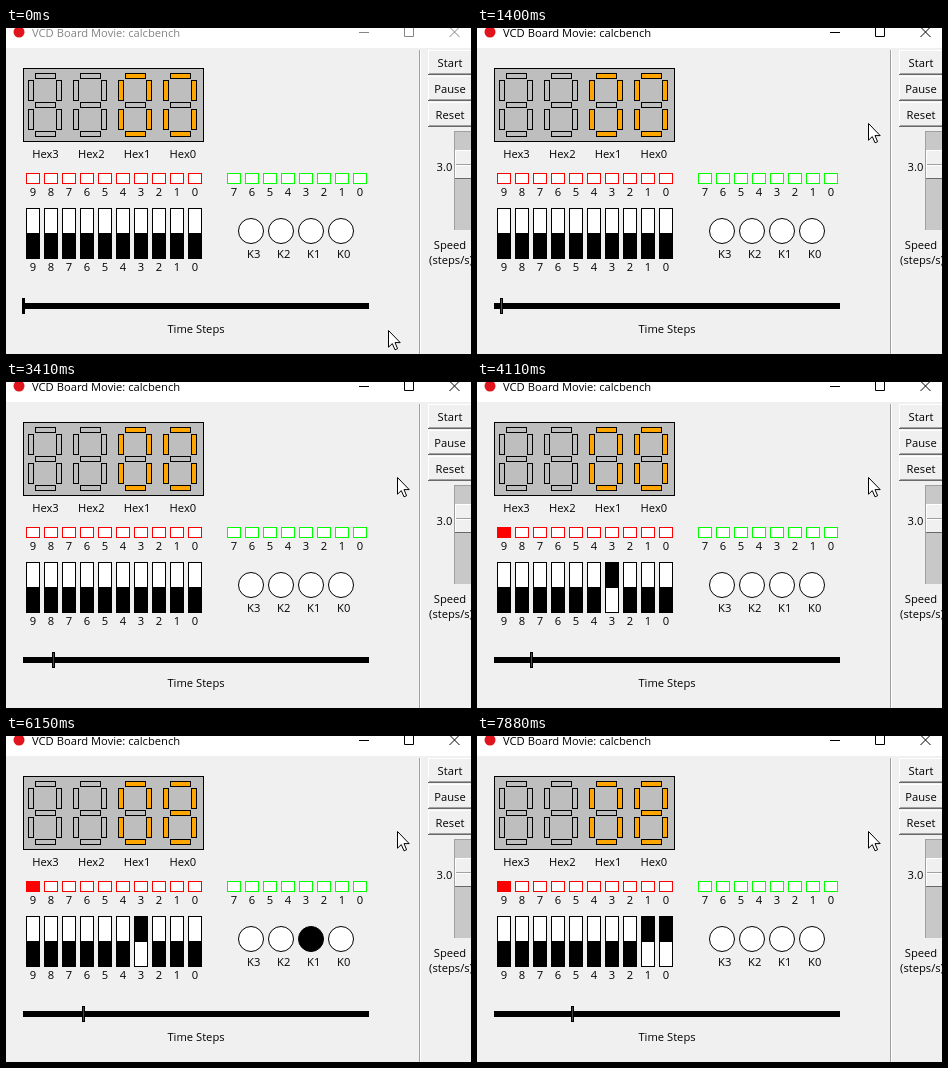
Animation, 465 px wide and 326 px high, one loop 8000 ms. Source, as an HTML page:

```html
<!DOCTYPE html>
<html lang="en">
<head>
<meta charset="utf-8">
<title>VCD Board Movie</title>
<style>
  html, body { margin: 0; width: 100%; height: 100%; overflow: hidden; background: #f0f0f0; }
  svg { display: block; }
  text { font: 11.2px "Open Sans", "Noto Sans", sans-serif; text-anchor: middle; }
  rect, line { shape-rendering: crispEdges; }
</style>
</head>
<body>
<svg id="stage" width="465" height="326" viewBox="0 0 465 326"></svg>
<script>
const LOOP = 8000;
const stage = document.getElementById('stage');

function add(tag, attrs, parent = stage) {
  const el = document.createElementNS('http://www.w3.org/2000/svg', tag);
  set(el, attrs);
  parent.appendChild(el);
  return el;
}
function set(el, attrs) {
  for (const key in attrs) el.setAttribute(key, attrs[key]);
}
const fillRect = (x, y, width, height, fill) => add('rect', { x, y, width, height, fill });

// Outline covers the pixels from (x1, y1) to (x2, y2), both included.
const box = (x1, y1, x2, y2, fill, stroke = '#000') =>
  add('rect', { x: x1 + .5, y: y1 + .5, width: x2 - x1, height: y2 - y1, fill, stroke });

function label(text, x, y, attrs = {}) {
  const el = add('text', { x, y, ...attrs });
  el.textContent = text;
  return el;
}

// Title bar
fillRect(0, 0, 465, 20, '#fff');
add('circle', { cx: 13, cy: 4, r: 5.5, fill: '#e0141c' });
const title = label('VCD Board Movie: calcbench', 26, 9, { style: 'text-anchor: start' });
const controls = add('path', {
  d: 'M353 4.5h10M398.5 -1.5h9v10h-9zM443.5 -1l10 10M453.5 -1l-10 10', fill: 'none'
});

// Seven-segment displays; segments run a to g
box(17, 40, 197, 113, '#bebebe');
const segmentBoxes = [
  [7, 45, 27, 50], [28, 52, 33, 72], [28, 81, 33, 101], [7, 103, 27, 108],
  [0, 81, 5, 101], [0, 52, 5, 72], [7, 74, 27, 79]
];
const digits = [3, 2, 1, 0].map((n, i) => {
  const x = 22 + 45 * i;
  label('Hex' + n, 39.5 + 45.8 * i, 130);
  return segmentBoxes.map(([x1, y1, x2, y2], s) =>
    box(x + x1, y1, x + x2, y2, i > 1 && s < 6 ? '#ffa500' : '#bebebe'));
});
const middleSegment = digits[3][6];

// LEDs
function ledRow(count, left, color) {
  return Array.from({ length: count }, (_, i) => {
    const x = left + 18 * i;
    label(count - 1 - i, x + 7, 168);
    return box(x, 145, x + 13, 155, '#fff', color);
  });
}
const clockLed = ledRow(10, 20, '#f00')[0];
ledRow(8, 221, '#0f0');

// Slide switches, indexed by their number
const switches = [];
for (let n = 9; n >= 0; n--) {
  const x = 20 + 18 * (9 - n);
  box(x, 180, x + 13, 230, '#fff');
  switches[n] = fillRect(x, 205, 14, 26, '#000');
  label(n, x + 7, 243);
}

// Push buttons, indexed by their number
const keys = [];
for (let n = 3; n >= 0; n--) {
  const cx = 245 + 30 * (3 - n);
  keys[n] = add('circle', { cx, cy: 203, r: 12.5, stroke: '#000' });
  label('K' + n, cx + 2.7, 230);
}

// Time line
fillRect(17, 275, 346, 6, '#000');
label('Time Steps', 190, 305);
const marker = add('g', {});
add('rect', { x: .5, y: 270.5, width: 2, height: 15, fill: 'none', stroke: '#000' }, marker);
const markerCore = add('rect', { x: 1, y: 271, width: 1, height: 14 }, marker);

// Side panel
fillRect(413, 22, 1, 304, '#a0a0a0');
fillRect(414, 22, 1, 304, '#fff');
['Start', 'Pause', 'Reset'].forEach((name, i) => {
  const y = 22 + 26 * i;
  fillRect(422, y, 43, 25, '#fff');
  fillRect(423, y + 1, 42, 24, '#f0f0f0');
  fillRect(423, y + 23, 42, 1, '#a0a0a0');
  fillRect(422, y + 24, 43, 1, '#696969');
  label(name, 444, y + 17);
});
label('3.0', 438.5, 143);
fillRect(448, 103, 17, 99, '#a0a0a0');
fillRect(449, 104, 16, 98, '#c8c8c8');
fillRect(449, 122, 16, 29, '#fff');
fillRect(450, 123, 15, 28, '#f0f0f0');
fillRect(449, 150, 16, 1, '#696969');
fillRect(450, 136, 15, 1, '#a0a0a0');
fillRect(450, 137, 15, 1, '#fff');
label('Speed', 444, 221);
label('(steps/s)', 445, 236);

// Pointer
const halo = add('circle', { cx: 439, cy: 34, r: 12, fill: '#fff000', opacity: .55 });
const pointer = add('path', {
  d: 'M.5 .5V17.2L4.3 13.6L7 19.8L9.6 18.7L7 12.6H12.2Z', fill: '#fff', stroke: '#000'
});

const stepTimes = [1070, 1400, 1780, 2100, 2400, 2800, 3100, 3410, 3790, 4110, 4510,
  4830, 5130, 5530, 5830, 6150, 6530, 6850, 7230, 7550, 7880];
const approachTimes = [70, 150, 220, 300, 380, 450, 530, 610];
const retreatTimes = [920, 1000, 1070];

const between = (t, start, end) => t >= start && t < end;
const passed = (times, t) => times.filter(time => t >= time).length;
const mix = (a, b, p) => Math.round(a + (b - a) * p);
const ease = p => p * p * (3 - 2 * p);

function pointerAt(t) {
  const back = passed(retreatTimes, t) / retreatTimes.length;
  if (back) return [mix(439, 391, ease(back)), mix(34, 95, ease(back))];
  if (t >= 690) return [439, 34];
  const p = ease(passed(approachTimes, t) / approachTimes.length);
  return [mix(382, 440, p), mix(302, 34, p)];
}

function render(t) {
  const active = t >= 690;
  set(title, { fill: active ? '#000' : '#858585' });
  set(controls, { stroke: active ? '#000' : '#858585' });

  const [x, y] = pointerAt(t);
  set(pointer, { transform: `translate(${x} ${y})` });
  set(halo, { visibility: between(t, 610, 750) ? 'visible' : 'hidden' });

  const step = passed(stepTimes, t);
  set(marker, { transform: `translate(${Math.floor(16 + 3.75 * step)} 0)` });
  set(markerCore, { fill: step % 4 === 2 ? '#f00' : step ? '#444' : '#000' });

  // The clock holds its level on the steps where switches move.
  const edges = step - (step >= 10) - (step >= 21);
  set(clockLed, { fill: edges % 2 ? '#f00' : '#fff' });

  const raised = { 3: between(t, 4110, 7880), 1: t >= 7880, 0: t >= 7880 };
  switches.forEach((knob, n) => set(knob, { y: raised[n] ? 180 : 205 }));

  const pressed = { 0: between(t, 4510, 5130), 1: between(t, 5830, 6530) };
  keys.forEach((key, n) => set(key, { fill: pressed[n] ? '#000' : '#fff' }));
  set(middleSegment, { fill: t >= 4830 ? '#ffa500' : '#bebebe' });
}

const start = performance.now();
function tick() {
  render((performance.now() - start) % LOOP);
  requestAnimationFrame(tick);
}
render(0);
requestAnimationFrame(tick);
</script>
</body>
</html>
```
